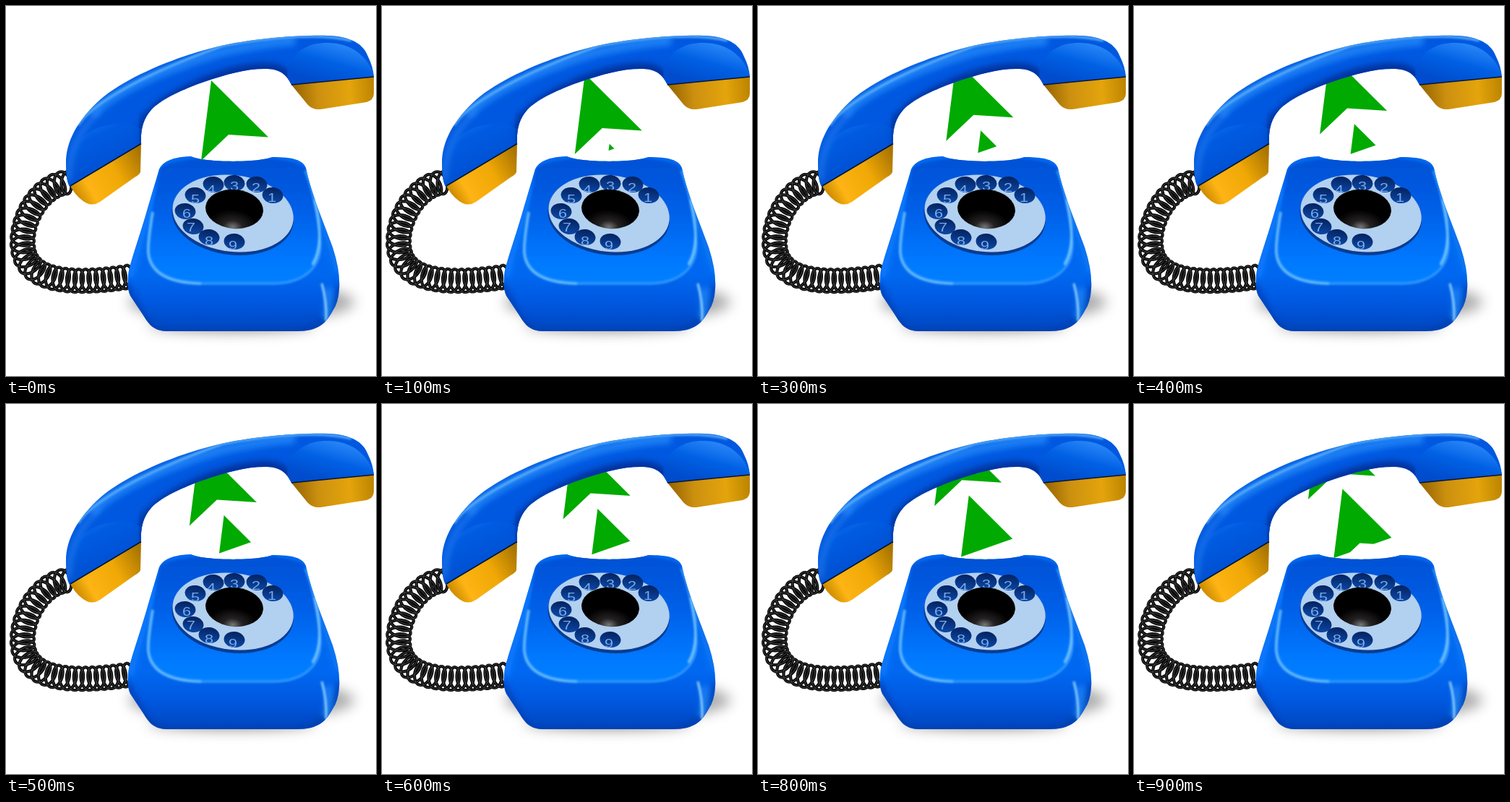
Write an HTML page that moves like this. It is 512 px wide and 512 px high and loops after 1000 ms.

```html
<!DOCTYPE html>
<html lang="en">
<head>
<meta charset="utf-8">
<title>Telephone</title>
<style>
html, body { margin: 0; width: 100%; height: 100%; overflow: hidden; background: #fff }
svg { display: block; width: 100vw; height: 100vh }
text { font: 16px Arial, "Liberation Sans", sans-serif; fill: #79a9e6; text-anchor: middle }
</style>
</head>
<body>
<svg viewBox="0 0 512 512" fill="none">
  <defs>
    <filter id="fine" x="-50%" y="-50%" width="200%" height="200%"><feGaussianBlur stdDeviation="1.5"/></filter>
    <filter id="soft" x="-50%" y="-50%" width="200%" height="200%"><feGaussianBlur stdDeviation="4"/></filter>
    <filter id="wide" x="-50%" y="-80%" width="200%" height="260%"><feGaussianBlur stdDeviation="9"/></filter>
    <linearGradient id="bodyFill" gradientUnits="userSpaceOnUse" x1="0" y1="370" x2="0" y2="450">
      <stop stop-color="#0068f0"/><stop offset=".5" stop-color="#0058e0"/><stop offset="1" stop-color="#0046be"/>
    </linearGradient>
    <linearGradient id="faceFill" gradientUnits="userSpaceOnUse" x1="0" y1="208" x2="0" y2="386">
      <stop stop-color="#0050d4"/><stop offset=".4" stop-color="#005ee6"/><stop offset=".8" stop-color="#0078ff"/><stop offset="1" stop-color="#0080ff"/>
    </linearGradient>
    <linearGradient id="earL" gradientUnits="userSpaceOnUse" x1="120" y1="150" x2="155" y2="225">
      <stop stop-color="#1a7cf4"/><stop offset=".35" stop-color="#005ce2"/><stop offset="1" stop-color="#004ccc"/>
    </linearGradient>
    <linearGradient id="earR" gradientUnits="userSpaceOnUse" x1="452" y1="48" x2="436" y2="106">
      <stop stop-color="#2a88f8"/><stop offset=".5" stop-color="#0060e4"/><stop offset="1" stop-color="#004ccc"/>
    </linearGradient>
    <linearGradient id="goldL" gradientUnits="userSpaceOnUse" x1="95" y1="260" x2="188" y2="206">
      <stop stop-color="#c98800"/><stop offset=".2" stop-color="#fdb414"/><stop offset=".6" stop-color="#f0a806"/><stop offset="1" stop-color="#a87400"/>
    </linearGradient>
    <linearGradient id="goldR" gradientUnits="userSpaceOnUse" x1="398" y1="120" x2="509" y2="112">
      <stop stop-color="#966400"/><stop offset=".3" stop-color="#cc9010"/><stop offset=".7" stop-color="#e4a40c"/><stop offset="1" stop-color="#bc8400"/>
    </linearGradient>
    <radialGradient id="knob" cx=".5" cy=".96" r=".55">
      <stop stop-color="#777"/><stop offset=".3" stop-color="#252222"/><stop offset=".8" stop-color="#000"/>
    </radialGradient>
    <linearGradient id="hole" x1="0" y1="0" x2="0" y2="1">
      <stop stop-color="#04225f"/><stop offset="1" stop-color="#0b48a8"/>
    </linearGradient>
    <path id="body" d="M211 229C214 218 225 209 256 208C275 217 350 217 368 209C397 209 411 213 415 224C422 259 440 301 452 334Q463 368 461 392Q460 410 452 422C443 438 434 450 402 450H222C202 449 197 439 188 425L172 401Q166 388 170 366C176 342 188 309 196 280Z"/>
    <path id="face" d="M213 226C206 270 198 315 197 340C199 368 222 383 270 384H372C412 383 436 362 435 328C432 290 424 250 413 224C400 204 226 204 213 226Z"/>
    <path id="grip" d="M88 250C84 243 83 230 83 220C82 188 99 158 131 129C169 97 240 68 300 54.5C350 44 410 40 445 41C478 42 495 53 501 70Q508 84 509 98L395 109C388 94 379 88 362 87C335 86 306 94 274 105C245 115 212 130 200 145C190 157 186 170 187 191L89 249Z"/>
    <path id="arrow" d="M0 0 79 78.5 24 75-14 111Z" fill="#0a0"/>
    <clipPath id="bodyClip"><use href="#body"/></clipPath>
    <clipPath id="gripClip"><use href="#grip"/></clipPath>
    <clipPath id="reveal"><path d="M180 150 220 100 300 70 400 65 512 130.6 180 246.8Z"/></clipPath>
  </defs>

  <g filter="url(#wide)" fill="#000">
    <ellipse cx="326" cy="410" rx="156" ry="28" opacity=".33"/>
    <ellipse cx="312" cy="442" rx="115" ry="9" opacity=".4"/>
  </g>

  <path id="cord" d="M88 244C52 244 21 290 23 330C25 372 65 391 174 374"/>
  <path id="coil" stroke="#0a0a0a" stroke-width="4.2"/>
  <path id="shine" stroke="#666" stroke-width=".6"/>

  <use href="#body" fill="url(#bodyFill)"/>
  <g clip-path="url(#bodyClip)">
    <g filter="url(#soft)">
      <path d="M204 250C192 310 178 340 172 375" stroke="#0f7cff" stroke-width="9"/>
      <path d="M418 228C430 280 446 315 460 368" stroke="#0878f4" stroke-width="9"/>
      <path d="M166 385 190 430Q202 451 225 451H402C435 448 458 422 462 385" stroke="#003cae" stroke-width="7"/>
      <path d="M446 390Q448 412 443 432" stroke="#1e84f8" stroke-width="9"/>
    </g>
    <use href="#face" fill="url(#faceFill)" filter="url(#fine)"/>
    <g filter="url(#fine)">
      <path d="M203 285C198 315 196 330 197 342C200 369 224 383 270 384" stroke="#6cc0ff" stroke-width="3.5"/>
      <path d="M270 384H372C412 383 436 362 435 328C432 290 424 250 414 228" stroke="#369cff" stroke-width="3"/>
      <path d="M427 268C435 300 438 335 424 358" stroke="#7ccaff" stroke-width="3"/>
      <path d="M437 384Q444 408 443 436" stroke="#90d2ff" stroke-width="3"/>
    </g>
  </g>

  <g transform="rotate(7 314 288)">
    <ellipse cx="314" cy="291" rx="84.5" ry="53.5" fill="#0a3c92"/>
    <ellipse cx="314" cy="287" rx="84" ry="53" fill="#b2d0f0"/>
  </g>
  <g id="dial"></g>
  <ellipse cx="316" cy="281" rx="40" ry="27" fill="url(#knob)" transform="rotate(5 316 281)"/>

  <g clip-path="url(#reveal)">
    <use id="lead" href="#arrow"/>
    <use id="next" href="#arrow"/>
  </g>

  <path d="M89 249 187 190 186 230Q184 234 178 237L130 271Q121 277 112 273Q98 266 89 249Z" fill="url(#goldL)"/>
  <path d="M395 109 509 98V121Q509 130 499 133L435 143Q424 144 417 136Z" fill="url(#goldR)"/>
  <use href="#grip" fill="#0058e0"/>
  <g clip-path="url(#gripClip)">
    <g filter="url(#soft)">
      <path d="M190 190C184 150 215 132 274 105C310 91 345 83 372 87Q390 92 396 112" stroke="#00309c" stroke-width="14"/>
      <path d="M118 150C150 117 220 86 300 63C340 54 370 50 400 48" stroke="#1a80f6" stroke-width="13"/>
    </g>
    <path d="M100 165C112 145 160 105 300 55C370 42 440 38 478 48" stroke="#62b4f8" stroke-width="3" filter="url(#fine)"/>
    <path d="M84 252C82 205 99 180 128 168Q164 157 187 170V194Z" fill="url(#earL)" opacity=".8"/>
    <path d="M391 110C384 83 397 61 426 53C468 45 499 63 510 99Z" fill="url(#earR)"/>
    <path d="M87 241C86 204 100 172 130 145" stroke="#3a94f8" stroke-width="3" filter="url(#soft)"/>
    <path d="M187 193Q190 170 192 150" stroke="#003ba8" stroke-width="9" filter="url(#soft)"/>
  </g>
  <path d="M89 249 187 190.5M395 109 509 98" stroke="#06142e" stroke-width="1.6"/>
</svg>
<script>
const $ = id => document.getElementById(id);

// Spiral cord wound around its centre line
const cord = $('cord'), length = cord.getTotalLength(), turns = 30;
function wind(radius) {
  let d = '';
  for (let i = 0; i <= 1200; i++) {
    const u = i / 1200, s = u * length, a = u * turns * 2 * Math.PI;
    const p = cord.getPointAtLength(s), q = cord.getPointAtLength(Math.min(s + 1, length));
    const r = cord.getPointAtLength(Math.max(s - 1, 0));
    const h = Math.atan2(q.y - r.y, q.x - r.x);
    const across = radius * Math.cos(a), along = 9 * Math.sin(a);
    const x = p.x + along * Math.cos(h) - across * Math.sin(h);
    const y = p.y + along * Math.sin(h) + across * Math.cos(h);
    d += (i ? 'L' : 'M') + x.toFixed(1) + ' ' + y.toFixed(1);
  }
  return d;
}
$('coil').setAttribute('d', wind(16));
$('shine').setAttribute('d', wind(16.5));

// Finger holes: hole centre, then digit baseline
const holes = [
  [369, 262, 368, 271], [347, 247, 346, 257], [316, 245, 316, 255],
  [287, 247, 284, 260], [262, 262, 262, 273], [248, 284, 250, 293],
  [259, 305, 256, 312], [281, 320, 281, 331], [316, 326, 314, 337]
];
$('dial').innerHTML = holes.map(([x, y, tx, ty], i) => {
  const rim = `<ellipse cx="${x}" cy="${y}" rx="14.5" ry="11" fill="url(#hole)" transform="rotate(7 ${x} ${y})"/>`;
  return `<clipPath id="rim${i}">${rim}</clipPath>${rim}
    <g clip-path="url(#rim${i})"><text transform="translate(${tx} ${ty}) scale(1.35 1)">${i + 1}</text></g>`;
}).join('');

const place = (id, x, y) => $(id).setAttribute('transform', `translate(${x} ${y})`);
function draw() {
  const k = Math.floor(performance.now() / 100) % 10;
  place('lead', 284 - 3.23 * k, 103 - 9.1 * k);
  place('next', 318 - 3.28 * k, 199.8 - 9.15 * k);
  requestAnimationFrame(draw);
}
draw();
</script>
</body>
</html>
```
